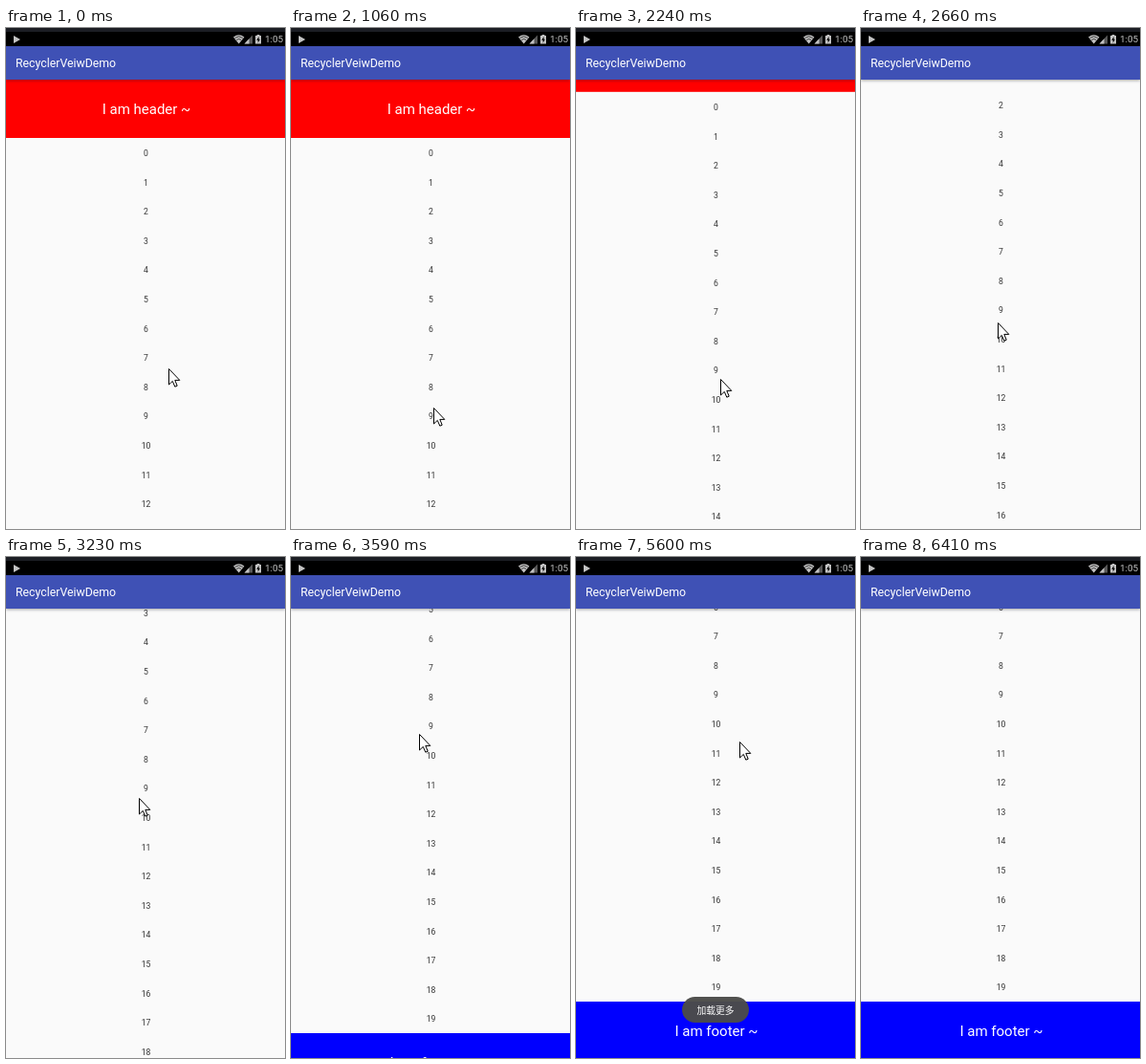
An HTML page for the animation above (7.12 s loop, 292 by 524 pixels).

```html
<!DOCTYPE html>
<html lang="en">
<head>
<meta charset="utf-8">
<title>RecyclerVeiwDemo</title>
<style>
  html, body { margin: 0; width: 100%; height: 100%; overflow: hidden; background: #fafafa; }
  body { position: relative; font-family: Roboto, "Noto Sans", sans-serif; }
  #stage { position: absolute; left: 0; top: 0; width: 292px; height: 524px; overflow: hidden; background: #fafafa; }
  #stage > * { position: absolute; }
  #status { left: 0; top: 0; }
  #clock { left: 271px; top: 4px; font-size: 9.8px; line-height: 16px; color: #c4c4c4; }
  #bar {
    left: 0; top: 19px; width: 292px; height: 35px; box-sizing: border-box; padding-left: 10px;
    background: #3f51b5; color: #fff; font-size: 12.3px; line-height: 36px;
    box-shadow: 0 1px 3px rgba(0, 0, 0, .35);
  }
  #view { left: 0; top: 54px; width: 292px; height: 470px; overflow: hidden; }
  #list { position: absolute; left: 0; top: 0; width: 292px; }
  .row { height: 30.6px; line-height: 32.2px; text-align: center; text-indent: 1px; font-size: 8.6px; color: #333; }
  .band { height: 61px; line-height: 63px; text-align: center; text-indent: 2px; font-size: 15px; color: #fff; }
  .head { background: #f00; }
  .foot { background: #00f; }
  #glow { left: 1px; top: 517px; width: 290px; height: 90px; border-radius: 50%; background: rgba(63, 81, 181, .14); }
  #toast {
    left: 111px; top: 460px; width: 70px; height: 27px; border-radius: 13.5px;
    background: rgba(76, 76, 74, .97); color: #fff; text-align: center; line-height: 28px;
    font-size: 9.8px; font-family: "Noto Sans CJK SC", "Noto Sans CJK", sans-serif;
  }
  #cursor { left: 0; top: 0; }
</style>
</head>
<body>
<div id="stage">
  <div id="view"><div id="list"></div></div>
  <div id="glow"></div>
  <svg id="status" width="292" height="20">
    <rect width="292" height="20"/>
    <rect width="292" height="4" fill="#1c1e24"/>
    <g fill="#c4c4c4">
      <path d="M8 8L15 12L8 16Z"/>
      <path d="M238 9.5Q243.7 5 249.4 9.5L243.7 16.5Z"/>
      <path d="M249.5 16.5L258 7.5V16.5Z" opacity=".45"/>
      <path d="M249.5 16.5L254.5 11.2V16.5Z"/>
      <path d="M261 8H262.6V7H265.4V8H267V16.5H261Z"/>
    </g>
    <path d="M239.6 10.4Q243.7 7.4 247.8 10.4M241.3 12.4Q243.7 10.6 246.1 12.4" fill="none" stroke="#000" stroke-width=".7"/>
    <path d="M264.6 9L262.2 12.7H263.7V15.6L265.9 11.7H264.6Z"/>
  </svg>
  <div id="clock">1:05</div>
  <div id="bar">RecyclerVeiwDemo</div>
  <div id="toast">加载更多</div>
  <svg id="cursor" width="14" height="22">
    <path d="M.5 .5V17L4.3 13.4L6.8 19.2L9.2 18.2L6.8 12.4H11.8Z" fill="#fff" stroke="#000" stroke-linejoin="round"/>
  </svg>
</div>
<script>
  const LOOP = 7120, BEAT = 135, LEAD = 90;   // ms; the screen refreshes once per beat
  const $ = id => document.getElementById(id);
  const clamp = v => Math.min(1, Math.max(0, v));

  // Key points: [beat, x, y] and [beat, offset]
  const pointer = [[0, 170, 356], [3, 137, 359], [4, 137, 359], [11, 158, 425], [14, 158, 423],
    [15, 157, 407], [20, 143, 308], [22, 143, 296], [27, 134, 185], [31, 129, 121], [36, 126, 99],
    [41, 126, 99], [43, 216, 286], [45, 270, 450], [48, 267, 535]];
  const scroll = [[14, 0], [15, 6], [20, 111.5], [22, 121.5], [27, 229], [29, 262]];

  function at(keys, beat, i = 1) {
    const n = keys.findIndex(k => k[0] > beat);
    if (n === 0) return keys[0][i];
    if (n < 0) return keys[keys.length - 1][i];
    const a = keys[n - 1], b = keys[n];
    return a[i] + (b[i] - a[i]) * (beat - a[0]) / (b[0] - a[0]);
  }

  function add(cls, text) {
    const el = document.createElement('div');
    el.className = cls;
    el.textContent = text;
    $('list').append(el);
  }

  add('band head', 'I am header ~');
  for (let i = 0; i < 20; i++) add('row', i);
  add('band foot', 'I am footer ~');

  function draw(time) {
    const beat = Math.floor((time % LOOP + LEAD) / BEAT);
    const x = Math.round(at(pointer, beat, 1)), y = Math.round(at(pointer, beat, 2));
    $('list').style.transform = `translateY(${-at(scroll, beat)}px)`;
    $('cursor').style.transform = `translate(${x}px, ${y}px)`;
    $('toast').style.opacity = Math.min(clamp((beat - 27) / 5), clamp((47 - beat) / 4));
    $('glow').style.opacity = beat >= 30 && beat < 42 ? 1 : 0;
  }

  let start;
  function frame(now) {
    start ??= now;
    draw(Math.max(0, now - start));
    requestAnimationFrame(frame);
  }
  draw(0);
  requestAnimationFrame(frame);
</script>
</body>
</html>
```
